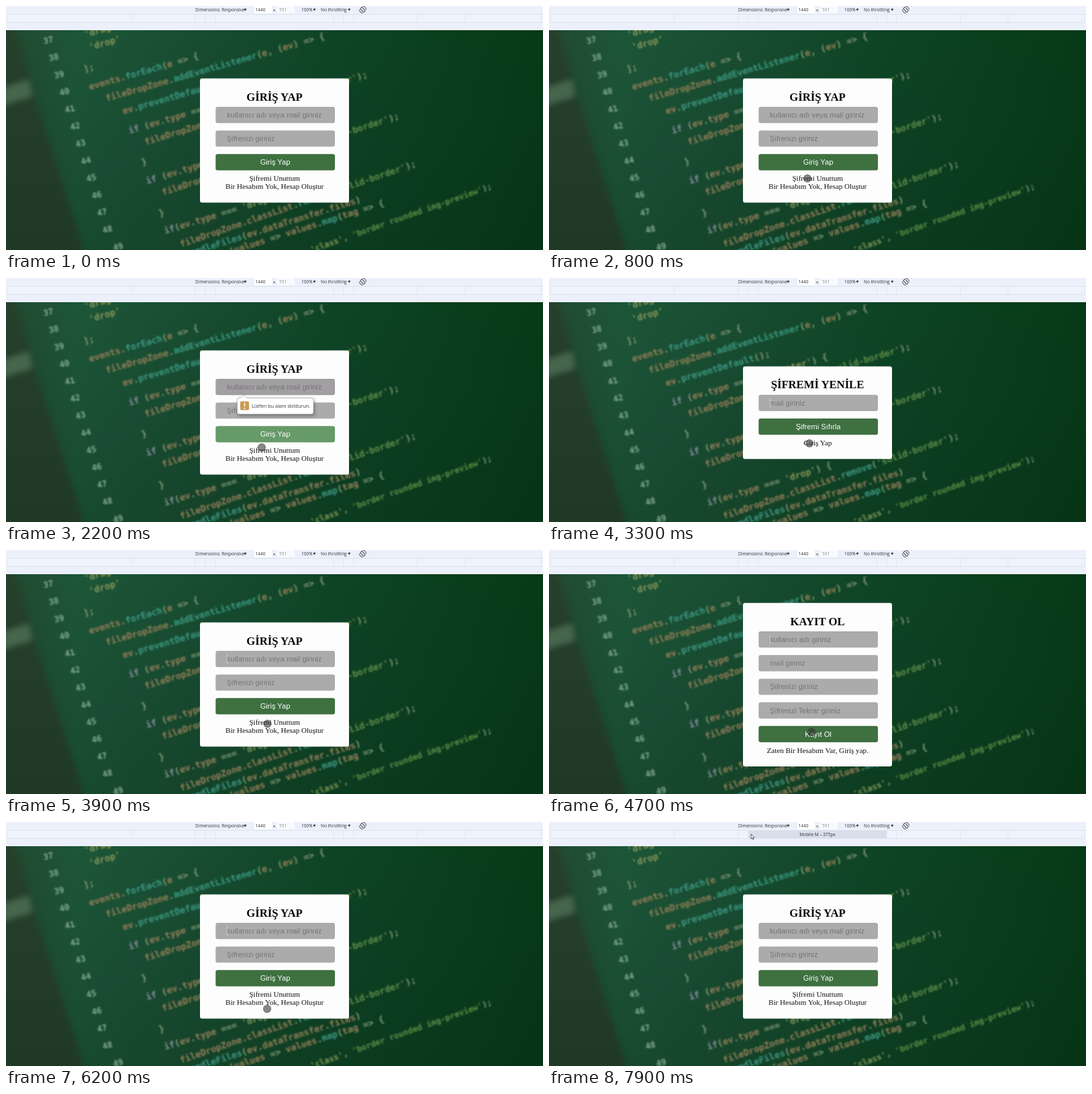
Animation of 800x363 px, one loop 8000 ms. Source, as an HTML page:

```html
<!DOCTYPE html>
<html lang="tr">
<head>
<meta charset="utf-8">
<title>Giriş Yap</title>
<style>
html, body { margin: 0; width: 100%; height: 100%; overflow: hidden; background: #0a3c1a; }
svg { display: block; width: 100%; height: 100%; }
text { white-space: pre; }
.code { font: bold 13.4px "DejaVu Sans Mono", monospace; }
.num { font: bold 12.5px "DejaVu Sans Mono", monospace; fill: #86ae8d; text-anchor: middle; }
.bar { font: 6.5px "Open Sans", sans-serif; fill: #30343a; }
.title { font: bold 16.67px "Liberation Serif", serif; fill: #080808; text-anchor: middle; }
.link { font: 11.11px "Liberation Serif", serif; fill: #111; text-anchor: middle; }
.field { font: 11.11px "Liberation Sans", sans-serif; fill: #767576; }
.button { font: 11.11px "Liberation Sans", sans-serif; fill: #fff; text-anchor: middle; }
.tip { font: 7.4px "Open Sans", sans-serif; fill: #333; }
</style>
</head>
<body>
<svg viewBox="0 0 800 363" preserveAspectRatio="none">
  <defs>
    <linearGradient id="photo">
      <stop offset="0" stop-color="#22492f"/>
      <stop offset=".13" stop-color="#1d5638"/>
      <stop offset=".35" stop-color="#184d30"/>
      <stop offset=".62" stop-color="#0e4424"/>
      <stop offset="1" stop-color="#063a17"/>
    </linearGradient>
    <linearGradient id="shade" x2="0" y2="1">
      <stop offset="0" stop-color="#123" stop-opacity="0"/>
      <stop offset="1" stop-color="#06200f" stop-opacity=".22"/>
    </linearGradient>
    <filter id="soft" x="-20%" y="-20%" width="140%" height="140%"><feGaussianBlur stdDeviation="4"/></filter>
    <filter id="haze" filterUnits="userSpaceOnUse" x="0" y="-40" width="800" height="480"><feGaussianBlur stdDeviation=".85"/></filter>
    <filter id="glow" x="-20%" y="-80%" width="140%" height="260%"><feGaussianBlur stdDeviation="2.5"/></filter>
    <clipPath id="view"><rect y="36" width="800" height="327"/></clipPath>
  </defs>
  <g clip-path="url(#view)">
    <rect y="36" width="800" height="327" fill="url(#photo)"/>
    <g filter="url(#soft)">
      <path d="M-20 20H8L44 140L122 380H-20Z" fill="#263f2a"/>
      <path d="M-10 124L34 110L39 134L-10 149Z" fill="#4b6b4f"/>
    </g>
    <rect y="36" width="800" height="327" fill="url(#shade)"/>
    <g id="code" filter="url(#haze)"></g>
  </g>
  <g id="bar"></g>
  <g id="card"></g>
  <g id="tip">
    <rect x="345.5" y="180" width="114" height="25" rx="3" opacity=".35" filter="url(#glow)"/>
    <path d="M347.5 178.5H349L354 174L359 178.5H455a3 3 0 0 1 3 3V199.500a3 3 0 0 1-3 3H347.500a3 3 0 0 1-3-3V181.500a3 3 0 0 1 3-3Z" fill="#fff" stroke="#a2a2a2" stroke-width=".7"/>
    <rect x="349" y="183.500" width="13" height="13" rx="1.500" fill="#c99b52"/>
    <path d="M355.500 185.500V191.500M355.500 193V195" stroke="#f8ebcf" stroke-width="1.900"/>
    <text class="tip" x="366" y="193.300">Lütfen bu alanı doldurun.</text>
  </g>
  <g id="touch"><circle r="6" fill="#323232" fill-opacity=".58"/><circle r="5.500" fill="none" stroke="#333" stroke-opacity=".25"/></g>
  <path id="arrow" d="M0 0V7.200L1.700 5.700L2.800 8.100L3.900 7.600L2.900 5.200H5Z" fill="#fff" stroke="#222" stroke-width=".7"/>
</svg>
<script>
const LOOP = 8000, STEP = 100, BLINK = 1060;
const $ = id => document.getElementById(id);
const esc = s => s.replace(/&/g, '&amp;').replace(/</g, '&lt;').replace(/>/g, '&gt;');
const label = (cls, x, y, s, extra = '') => `<text class="${cls}" x="${x}" y="${y}" ${extra}>${esc(s)}</text>`;
const box = (x, y, w, h, fill, extra = '') => `<rect x="${x}" y="${y}" width="${w}" height="${h}" fill="${fill}" ${extra}/>`;

// Blurred editor lines: x, baseline, angle, text
const lines = [
  [118, 47, -16, "'drag',"],
  [125, 66, -16, "'drop'"],
  [117, 99, -16, '];'],
  [125, 125, -16, 'events.forEach(e => {'],
  [150, 142, -16, 'fileDropZone.addEventListener(e, (ev) => {'],
  [175, 161, -16, 'ev.preventDefault();'],
  [184, 190, -16.500, "if (ev.type === 'dragenter') {"],
  [208, 207, -17, "fileDropZone.classList.add('solid-border');"],
  [203, 237, -17, '}'],
  [210, 265, -17, "if (ev.type === 'dragleave') {"],
  [234, 282, -18, "fileDropZone.classList.remove('solid-border');"],
  [229, 313, -17, '}'],
  [237, 339, -17, "if(ev.type === 'drop') {"],
  [261, 359, -19, "fileDropZone.classList.remove('solid-border');"],
  [268, 374, -17.500, 'handleFiles(ev.dataTransfer.files)'],
  [295, 382, -17.500, '.then(values => values.map(tag => {'],
  [455, 367, -19.500, "'class', 'border rounded img-preview');", 12.2]
];

function tint(token, next) {
  if (token[0] === "'") return /border/.test(token) ? '#63904a' : '#8a9a5a';
  if (token === 'if') return '#8d8fa0';
  if (!/\w/.test(token)) return '#879f7a';
  return next && next[0] === '(' ? '#3f9a86' : '#99805a';
}

function codeLine([x, y, angle, s, size = 13.4]) {
  const tokens = s.match(/'[^']*'|\w+|[^\w']+/g);
  const spans = tokens.map((k, i) => `<tspan fill="${tint(k, tokens[i + 1])}">${esc(k)}</tspan>`).join('');
  return `<text class="code" transform="translate(${x} ${y}) rotate(${angle})" style="font-size:${size}px">${spans}</text>`;
}

function lineNumbers() {
  let out = '';
  for (let n = 36; n < 50; n++) {
    const i = n - 37, x = 64 + 8 * i + (n === 49 ? 8 : 0), y = 55 + 25.6 * i;
    out += label('num', 0, 0, String(n), `transform="translate(${x} ${y}) rotate(-13)"`);
  }
  return out;
}

function toolbar() {
  const caret = x => `<path d="M${x} 4h4l-2 3.400z" fill="#333"/>`;
  const marks = [2, 187, 282, 297, 312, 488, 503, 518, 613, 684, 798];
  return box(0, 0, 800, 36, '#ebf0fa') + box(0, 12.5, 800, 12, '#eef3fc') +
    box(297, 13, 206, 11, '#d9dfea', 'id="band"') +
    `<path d="M0 12.500H800M0 24.500H800${marks.map(x => `M${x} 13V24`).join('')}" stroke="#d9e0ec" stroke-width=".7"/>` +
    box(370, 0, 26, 11, '#fff') + box(404, 0, 26, 11, '#f8fafd') +
    label('bar', 282, 8, 'Dimensions: Responsive') + label('bar', 371.5, 8, '1440') +
    label('bar', 397.8, 8.6, '×') + label('bar', 407, 8, '591', 'style="fill:#8b9098"') +
    label('bar', 440, 8, '100%') + label('bar', 469, 8, 'No throttling') +
    [354.500, 457.500, 509.300].map(caret).join('') +
    `<g transform="translate(531.500 5.500)" fill="none" stroke="#444" stroke-width="1">
      <rect x="-1.800" y="-3.800" width="3.600" height="7.600" rx=".8" transform="rotate(-45)"/>
      <path d="M0 -5A5 5 0 0 1 5 0M0 5A5 5 0 0 1 -5 0"/></g>` +
    label('bar', 400, 20.8, 'Mobile M – 375px', 'id="hint" text-anchor="middle"');
}

const pages = {
  login: {
    top: 150, title: 'GİRİŞ YAP', button: 'Giriş Yap',
    fields: ['kullanıcı adı veya mail giriniz', 'Şifrenizi giriniz'],
    links: ['Şifremi Unuttum', 'Bir Hesabım Yok, Hesap Oluştur']
  },
  reset: {
    top: 173.8, title: 'ŞİFREMİ YENİLE', button: 'Şifremi Sıfırla',
    fields: ['mail giriniz'], links: ['Giriş Yap']
  },
  join: {
    top: 121.1, title: 'KAYIT OL', button: 'Kayıt Ol',
    fields: ['kullanıcı adı giriniz', 'mail giriniz', 'Şifrenizi giriniz', 'Şifrenizi Tekrar giriniz'],
    links: ['Zaten Bir Hesabım Var, Giriş yap.']
  }
};

function card({ top, title, button, fields, links }) {
  const gap = 35.15, by = top + gap * fields.length;
  const end = by + 40 + 12 * (links.length - 1) + 20.3;
  return box(289, top - 42.3, 222, end - top + 42.3, '#fefdfe', 'rx="3"') +
    label('title', 400, top - 9.5, title) +
    fields.map((s, i) => box(312.3, top + gap * i, 177.7, 24.2, '#acabac', `rx="3"${i ? '' : ' id="first"'}`) +
      label('field', 329, top + gap * i + 16, s)).join('') +
    box(329, top + 5.5, 0.7, 13, '#e8e8e8', 'id="caret"') +
    box(311, by, 180, 27, '#9fd8b8', 'rx="4" id="halo" filter="url(#glow)"') +
    box(312.3, by, 177.7, 24.2, '#3f7040', 'rx="3" id="press"') +
    label('button', 401, by + 16, button, 'id="word"') +
    links.map((s, i) => label('link', 400.2, by + 40 + 12 * i, s)).join('');
}

// Page loads: time, page, whether its first field has focus
const loads = [[0, 'login', false], [3300, 'reset', true], [3700, 'login', true],
  [4700, 'join', true], [5800, 'login', true]];

const path = [[100, 392, 372], [900, 384, 240], [1200, 382, 229], [1800, 382, 229],
  [2200, 381, 252], [2500, 387, 254], [3000, 388, 254], [3300, 388, 246], [3700, 388, 246],
  [4100, 391, 271], [5100, 391, 271], [5500, 390, 297], [5800, 390, 297], [6200, 389, 278],
  [6600, 378, 205], [6800, 378, 205], [6900, 365, 150], [7000, 365, 150], [7400, 318, 24], [7900, 301, 18]];
const wash = [[1200, 63, 112, 64], [1400, 123, 163, 138], [1800, 102, 154, 105]];

function along(keys, t) {
  if (t <= keys[0][0]) return keys[0].slice(1);
  for (let i = 1; i < keys.length; i++) {
    const a = keys[i - 1], b = keys[i];
    if (t <= b[0]) {
      const k = (t - a[0]) / (b[0] - a[0]);
      return a.slice(1).map((v, j) => v + (b[j + 1] - v) * k);
    }
  }
  return keys[keys.length - 1].slice(1);
}

const set = (id, name, value) => $(id).setAttribute(name, value);
const show = (id, on) => set(id, 'visibility', on ? 'visible' : 'hidden');

let current = null;

function draw(now) {
  const t = Math.floor((now % LOOP) / STEP) * STEP;
  const load = loads.filter(l => l[0] <= t).pop();
  if (load !== current) {
    current = load;
    $('card').innerHTML = card(pages[load[1]]);
  }

  const opening = t < 3300, warned = opening && t >= 1400;
  const focusAt = warned ? 1400 : load[0];
  show('caret', (warned || load[2]) && (t - focusAt) % BLINK < BLINK / 2);
  set('first', 'fill', warned ? '#a19fa1' : '#acabac');
  set('press', 'fill', `rgb(${opening ? along(wash, t) : '63,112,64'})`);
  const pulse = opening ? Math.max(0, 1 - Math.abs(t - 1450) / 350) : 0;
  set('halo', 'opacity', pulse * 0.7);
  set('word', 'opacity', 1 - pulse * 0.25);
  set('tip', 'opacity', t >= 1400 && t < 2800 ? Math.min(1, 0.16 + (t - 1400) / 240) : 0);

  const [x, y] = along(path, t), inBar = y < 36;
  const place = `translate(${x} ${y})`;
  set('touch', 'transform', place);
  set('arrow', 'transform', place);
  show('touch', t >= 100 && !inBar);
  show('arrow', t >= 100 && inBar);
  show('band', inBar && y < 25);
  show('hint', inBar && y < 25);
}

$('code').innerHTML = lineNumbers() + lines.map(codeLine).join('');
$('bar').innerHTML = toolbar();
const start = performance.now();
function tick() {
  draw(performance.now() - start);
  requestAnimationFrame(tick);
}
tick();
</script>
</body>
</html>
```
